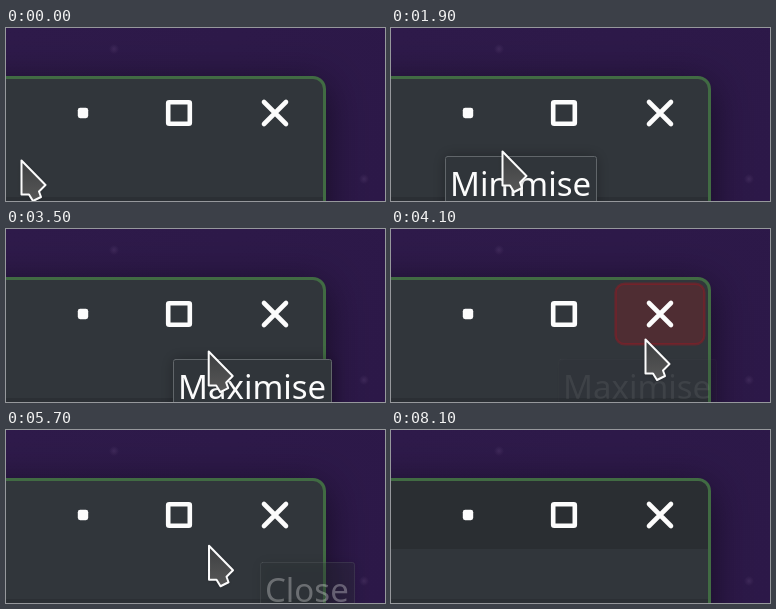
An HTML page with a canvas for the animation above (8.2 s loop, 379 px wide and 173 px high).

```html
<!DOCTYPE html>
<html lang="en">
<head>
<meta charset="utf-8">
<title>Window buttons</title>
<style>
html, body { margin: 0; width: 100%; height: 100%; overflow: hidden; background: #2b1846; }
canvas { display: block; width: 379px; height: 173px; }
</style>
</head>
<body>
<canvas id="stage" width="379" height="173"></canvas>
<script>
const ctx = document.getElementById('stage').getContext('2d');
const W = 379, H = 173, LOOP = 8200, STEP = 100;
const INK = '#fcfcfc';

const green = { fill: '51,119,48', line: '58,165,42' };
const red = { fill: '138,27,38', line: '190,13,24' };

const buttons = [
  { x: 77, color: green, icon: drawMinimise, label: 'Minimise' },
  { x: 173, color: green, icon: drawMaximise, label: 'Maximise' },
  { x: 269, color: red, icon: drawClose, label: 'Close' }
];

// The pointer rests on one button after another; the picture holds from still to tip.
const visits = [
  { button: 0, x: 51, y: 110, arrive: 700, still: 900, tip: 1300, leave: 1400, tipX: 54, tipY: 128 },
  { button: 1, x: 171, y: 108, arrive: 2400, still: 2400, tip: 2700, leave: 3100, tipX: 167, tipY: 130 },
  { button: 2, x: 254, y: 110, arrive: 4100, still: 4300, tip: 4300, leave: 4800, tipX: 254, tipY: 132 },
  { button: 1, x: 199, y: 111, arrive: 5800, still: 6000, tip: 6000, leave: 6400, tipX: 199, tipY: 133 }
];
const stops = [
  { x: 15, y: 132, leave: 300 },
  ...visits,
  { x: 108, y: 177, arrive: 7000 }
];

const ramp = (t, from, span) => Math.min(1, Math.max(0, (t - from) / span));
const mix = (a, b, k) => a + (b - a) * k;
const ease = k => (k + k * k * (3 - 2 * k)) / 2;

function frameTime(ms) {
  const t = Math.floor(ms / STEP) * STEP;
  const rest = visits.find(v => t >= v.still && t < v.tip);
  return rest ? rest.still : t;
}

function cursorAt(t) {
  const i = Math.max(1, stops.findLastIndex(s => t >= s.leave) + 1);
  const a = stops[i - 1], b = stops[i];
  const k = ramp(t, a.leave, b.arrive - a.leave);
  const e = ease(k);
  // Hops between buttons dip below the button row
  const dip = visits.includes(a) && visits.includes(b) ? 14 : 0;
  return [mix(a.x, b.x, e), mix(a.y, b.y, e) + dip * Math.sin(Math.PI * k)];
}

const glowOf = (v, t) => ramp(t, v.arrive - 100, 300) * (1 - ramp(t, v.leave + 300, 100));
const tipAlpha = (v, t) => t < v.tip ? 0 : 1 - ramp(t, v.leave + 600, 430);

function roundRect(x, y, w, h, r) {
  ctx.beginPath();
  ctx.roundRect(x, y, w, h, r);
}

function drawDesktop() {
  const g = ctx.createLinearGradient(0, 0, W, H);
  g.addColorStop(0, '#2e1a4a');
  g.addColorStop(1, '#2c1848');
  ctx.fillStyle = g;
  ctx.fillRect(0, 0, W, H);
  for (const [x, y] of [[108, 21], [358, 151]]) {
    const spot = ctx.createRadialGradient(x, y, 0, x, y, 5);
    spot.addColorStop(0, 'rgba(90,65,115,.4)');
    spot.addColorStop(1, 'rgba(90,65,115,0)');
    ctx.fillStyle = spot;
    ctx.fillRect(x - 5, y - 5, 10, 10);
  }
}

function drawWindow(dim) {
  ctx.save();
  ctx.shadowColor = 'rgba(0,0,0,.52)';
  ctx.shadowBlur = 38;
  ctx.shadowOffsetY = 8;
  ctx.fillStyle = '#416b43';
  roundRect(-60, 48, 380, 300, 13);
  ctx.fill();
  ctx.restore();

  ctx.save();
  roundRect(-60, 51, 377, 300, 10);
  ctx.clip();
  ctx.fillStyle = '#31363b';
  ctx.fillRect(0, 51, 320, 122);
  ctx.fillStyle = '#2b2f34';
  ctx.fillRect(0, 169, 320, 4);
  ctx.fillStyle = `rgba(42,46,50,${dim})`;
  ctx.fillRect(0, 51, 320, 68);
  ctx.restore();
}

function drawMinimise(x) {
  roundRect(x - 5.2, 79.8, 10.4, 10.4, 2.4);
  ctx.fill();
}

function drawMaximise(x) {
  roundRect(x - 10.8, 74.2, 21.6, 21.6, 1);
  ctx.stroke();
}

function drawClose(x) {
  ctx.beginPath();
  for (const s of [-1, 1]) {
    ctx.moveTo(x - 11 * s, 74);
    ctx.lineTo(x + 11 * s, 96);
  }
  ctx.stroke();
}

function drawGlow(v, t) {
  const a = glowOf(v, t);
  if (a <= 0) return;
  const { x, color } = buttons[v.button];
  roundRect(x - 44.4, 54.8, 88.8, 60.4, 9);
  ctx.fillStyle = `rgba(${color.fill},${a})`;
  ctx.fill();
  ctx.strokeStyle = `rgba(${color.line},${a})`;
  ctx.lineWidth = 2.4;
  ctx.stroke();
}

function drawIcon({ x, icon }) {
  ctx.fillStyle = ctx.strokeStyle = INK;
  ctx.lineWidth = 4.6;
  ctx.lineCap = 'round';
  icon(x);
}

function drawTip(v, t) {
  const a = tipAlpha(v, t);
  if (a <= 0) return;
  const { label } = buttons[v.button];
  ctx.save();
  ctx.globalAlpha = a;
  ctx.font = '33px "Noto Sans", sans-serif';
  const w = Math.round(ctx.measureText(label).width) + 10;
  roundRect(v.tipX + .5, v.tipY + .5, w, 60, 2);
  ctx.shadowColor = 'rgba(0,0,0,.3)';
  ctx.shadowBlur = 14;
  ctx.fillStyle = '#30353a';
  ctx.fill();
  ctx.shadowColor = 'transparent';
  ctx.strokeStyle = '#61666a';
  ctx.lineWidth = 1;
  ctx.stroke();
  ctx.fillStyle = INK;
  ctx.fillText(label, v.tipX + 5, v.tipY + 40);
  ctx.restore();
}

function drawCursor(x, y) {
  ctx.save();
  ctx.translate(x, y);
  ctx.beginPath();
  ctx.moveTo(.5, .5);
  for (const [px, py] of [[.5, 34.5], [8, 34.5], [12, 41], [20, 37], [18, 31.5], [24.5, 25]]) {
    ctx.lineTo(px, py);
  }
  ctx.closePath();
  const g = ctx.createLinearGradient(0, 0, 0, 41);
  g.addColorStop(0, '#3c3e40');
  g.addColorStop(1, '#585858');
  ctx.fillStyle = g;
  ctx.shadowColor = 'rgba(0,0,0,.3)';
  ctx.shadowBlur = 4;
  ctx.shadowOffsetY = 1;
  ctx.fill();
  ctx.shadowColor = 'transparent';
  ctx.strokeStyle = INK;
  ctx.lineWidth = 2;
  ctx.lineJoin = 'round';
  ctx.stroke();
  ctx.restore();
}

function draw(t) {
  drawDesktop();
  drawWindow(ramp(t, 7000, 300));
  visits.forEach(v => drawGlow(v, t));
  buttons.forEach(drawIcon);
  visits.forEach(v => drawTip(v, t));
  drawCursor(...cursorAt(t));
}

const start = performance.now();
function tick() {
  draw(frameTime((performance.now() - start) % LOOP));
  requestAnimationFrame(tick);
}
tick();
</script>
</body>
</html>
```
